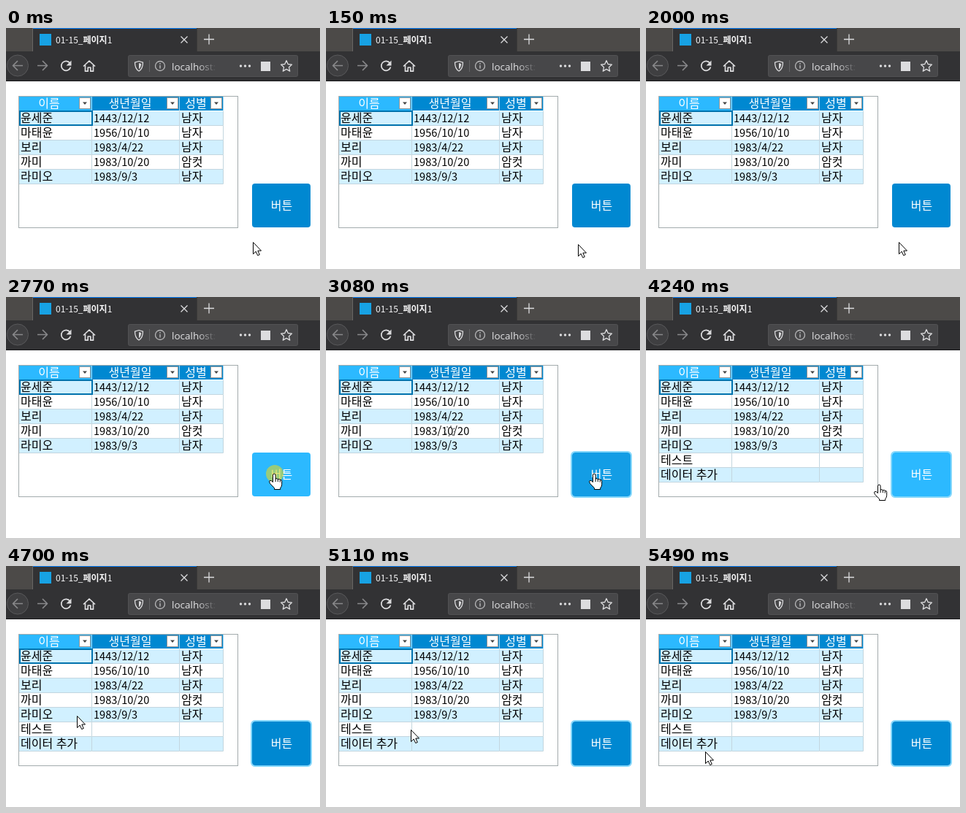
Recreate the animation shown at these times as an HTML page. Size 430x330 px, loop 6120 ms.

```html
<!DOCTYPE html>
<html lang="ko">
<head>
<meta charset="utf-8">
<title>01-15_페이지1</title>
<style>
  html, body { margin: 0; width: 100%; height: 100%; overflow: hidden; background: #fff; }
  svg { display: block; }
  text { font: 16px "Noto Sans CJK KR", "Noto Sans CJK JP", "Noto Sans CJK", sans-serif; }
  .date { font-size: 14.6px; }
  .tab { font-size: 12px; fill: #f9f9fa; }
  .url { font: 13.5px "Open Sans", "Noto Sans", sans-serif; fill: url(#fade); }
  .white { fill: #fff; text-anchor: middle; }
  .icon { fill: none; stroke: #dcdcde; stroke-width: 1.7; stroke-linejoin: round; }
  .thin { stroke-width: 1.3; }
  .dim { stroke: #88888a; }
</style>
</head>
<body>
<svg width="430" height="330" viewBox="0 0 430 330">
  <defs>
    <linearGradient id="fade" gradientUnits="userSpaceOnUse" x1="262" x2="288">
      <stop stop-color="#e4e4e6"/>
      <stop offset="1" stop-color="#e4e4e6" stop-opacity="0"/>
    </linearGradient>
  </defs>

  <!-- browser window -->
  <rect width="430" height="33" fill="#4c4a48"/>
  <rect y="32" width="430" height="41" fill="#323234"/>
  <rect x="37" width="224" height="33" fill="#323234"/>
  <rect x="37" width="224" height="1" fill="#0a84ff"/>
  <path d="M36.5 0V32" stroke="#686664"/>
  <path d="M261.5 0V32" stroke="#3b3a39"/>
  <path d="M0 72.5H430" stroke="#19191b"/>
  <rect x="46" y="8" width="16" height="16" fill="#17a2e4"/>
  <text class="tab" x="68" y="20.5">01-15_<tspan font-weight="bold">페이지</tspan>1</text>
  <path class="icon thin" d="M239.5 11.5l9 9m0-9l-9 9M271 15.5h14M278 8.5v14"/>
  <circle cx="16" cy="51.500" r="14.500" fill="#3f3f41" stroke="#59595b"/>
  <path class="icon dim" d="M23 51.500H9.500m6.500-6.500l-6.500 6.500 6.500 6.500M43 51.500h13.500m-6.500-6.500l6.500 6.500-6.500 6.500"/>
  <path class="icon" d="M87.500 48a6.500 6.500 0 1 0 1 5.500"/>
  <path fill="#dcdcde" d="M89.500 44.500v7h-7z"/>
  <path class="icon" d="M106 52.500l8-7.500 8 7.500M108.500 51v8.200h3.700V54h3.600v5.200h3.700V51"/>
  <rect x="167.500" y="37.500" width="232" height="29" rx="2" fill="#474749" stroke="#525254"/>
  <path class="icon thin" d="M182 45.500l5.500 1.700q0 8.500-5.500 11.800-5.500-3.300-5.500-11.800z"/>
  <path fill="#dcdcde" d="M182 48l3.200 1q-.2 5-3.200 7.400z"/>
  <path d="M196.500 44V60" stroke="#626264"/>
  <circle class="icon thin" cx="211" cy="52" r="6.500" opacity=".75"/>
  <path d="M211 48v1.700M211 51v4.500" stroke="#b1b1b3" stroke-width="1.500"/>
  <text class="url" x="227" y="57.500">localhost:</text>
  <g fill="#dcdcde">
    <circle cx="321.500" cy="52" r="1.700"/><circle cx="327.500" cy="52" r="1.700"/><circle cx="333.500" cy="52" r="1.700"/>
    <rect x="349" y="46" width="13" height="13"/>
  </g>
  <path class="icon thin" d="M384 44.500l2.200 5 5.300.6-4 3.700 1.200 5.300-4.700-2.700-4.700 2.700 1.200-5.300-4-3.700 5.300-.6z"/>

  <!-- page -->
  <rect x="17.500" y="93.500" width="300" height="180" fill="#fff" stroke="#a3abad"/>
  <g id="grid"></g>
  <rect x="19" y="114" width="99" height="19" fill="none" stroke="#0072ad" stroke-width="2"/>
  <circle id="spinner" cx="169.500" cy="183.500" r="6.500" fill="none" stroke="#6a6e70" stroke-width="2" stroke-dasharray="1.600 3.500"/>
  <rect id="button" x="337" y="213" width="80" height="60" rx="4"/>
  <rect id="ring" x="336" y="212" width="82" height="62" rx="5" fill="none" stroke="#84d7fb" stroke-width="2"/>
  <text class="white" x="377.500" y="249">버튼</text>
  <circle id="click" cx="368" cy="242" r="12" fill="#dcd62c" opacity=".62"/>
  <g id="cursor" fill="#fff" stroke="#000" stroke-linejoin="round">
    <path id="arrow" d="M.5.500V16.500L4.200 13 6.700 18.500 9.300 17.400 6.800 12H11.500z"/>
    <path id="hand" transform="translate(-.5 -.5)" d="M-2 2.500q0-2 1.800-2t1.800 2v5q2-1 3.200.500 2-.7 3 .7 2.400-.3 2.400 2v4.300q0 3-2 5v2h-8.200v-2L-5.800 14q-2-3-.5-4 2-.9 4.300 2zM1.600 7.500v4M4.800 8v3.500M7.800 9v3"/>
  </g>
</svg>
<script>
const LOOP = 6120;
const $ = id => document.getElementById(id);
const columns = [
  { x: 18, width: 99, title: "이름", middle: 59, color: "#2cb9ff" },
  { x: 118, width: 119, title: "생년월일", middle: 170, color: "#0088d1" },
  { x: 238, width: 59, title: "성별", middle: 260, color: "#0088d1" }
];
const people = [
  ["윤세준", "1443/12/12", "남자"],
  ["마태윤", "1956/10/10", "남자"],
  ["보리", "1983/4/22", "남자"],
  ["까미", "1983/10/20", "암컷"],
  ["라미오", "1983/9/3", "남자"],
  ["테스트", "", ""],
  ["데이터 추가", "", ""]
];

const header = ({ x, width, title, middle, color }) => {
  const right = x + width;
  return `
    <rect x="${x}" y="94" width="${width}" height="19" fill="${color}"/>
    <path d="M${right + .5} 94v19" stroke="#9ed4f2"/>
    <text class="white" x="${middle}" y="109">${title}</text>
    <rect x="${right - 16.5}" y="95.5" width="15" height="15" fill="#fff" stroke="#959595"/>
    <path d="M${right - 12} 101.5h6l-3 3.5z" fill="#444"/>`;
};

const row = (cells, i) => {
  const y = 114 + 20 * i;
  const cell = ({ x, width }, j) => `
    <rect x="${x}" y="${y}" width="${width}" height="19" fill="${i % 2 ? "#fff" : "#d1f0ff"}"/>
    <path d="M${x} ${y + 19.5}h${width + .5}v-20" fill="none" stroke="#c3d6df"/>
    <text class="${j == 1 ? "date" : ""}" x="${x + 2}" y="${y + 15}">${cells[j]}</text>`;
  return `<g ${i > 4 ? 'class="added"' : ""}>${columns.map(cell).join("")}</g>`;
};

$("grid").innerHTML = people.map(row).join("") + columns.map(header).join("");
const added = document.querySelectorAll(".added");

// Each cursor move is a cubic curve, shown in a few equal time steps
const moves = [
  { start: 0, end: 150, steps: 2, xs: [338, 340, 343, 345], ys: [293, 294, 295, 296] },
  { start: 2000, end: 2230, steps: 3, xs: [346, 352, 362, 368], ys: [293, 278, 255, 242] },
  { start: 4240, end: 4790, steps: 7, xs: [320, 240, 219, 23], ys: [257, 330, 155, 219] },
  { start: 4870, end: 5490, steps: 8, xs: [15, 140, 178, 81], ys: [232, 260, 150, 254] }
];

const ramp = (t, from, to) => Math.min(1, Math.max(0, (t - from) / (to - from)));
const bezier = ([a, b, c, d], u) =>
  a * (1 - u) ** 3 + 3 * b * u * (1 - u) ** 2 + 3 * c * u * u * (1 - u) + d * u ** 3;
const mix = (a, b, k) => Math.round(a + (b - a) * k);
const show = (el, on) => el.setAttribute("visibility", on ? "visible" : "hidden");

function draw(t) {
  const { start, end, steps, xs, ys } = moves.filter(m => m.start <= t).pop();
  const u = Math.min(1, Math.floor(ramp(t, start, end) * steps + .2) / steps);
  $("cursor").setAttribute("transform", `translate(${Math.round(bezier(xs, u))} ${Math.round(bezier(ys, u))})`);

  // hover, press, release, leave
  const glow = ramp(t, 2000, 2230) - ramp(t, 2770, 2930) + ramp(t, 3020, 3160) - ramp(t, 4240, 4480);
  $("button").setAttribute("fill", `rgb(${mix(0, 44, glow)},${mix(136, 185, glow)},${mix(209, 255, glow)})`);

  const hand = t >= 2090 && t < 4340;
  show($("hand"), hand);
  show($("arrow"), !hand);
  show($("click"), t >= 2770 && t < 2930);
  show($("ring"), t >= 2850);
  show($("spinner"), t >= 3080 && t < 3160);
  added.forEach(g => show(g, t >= 3160));
}

const begin = performance.now();
function tick() {
  draw((performance.now() - begin) % LOOP);
  requestAnimationFrame(tick);
}
tick();
</script>
</body>
</html>
```
